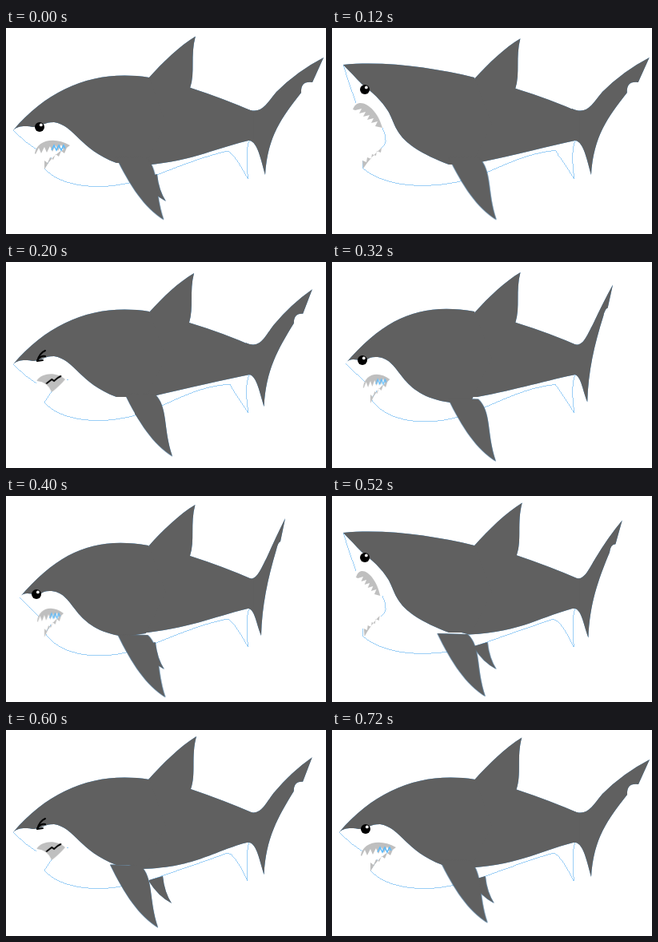
An HTML page without scripts that plays this animation: 400x258 px, repeating every 0.76 s.

```html
<!DOCTYPE html>
<html lang="en">
<head>
<meta charset="utf-8">
<title>Biting shark</title>
<style>
:root { --sine: cubic-bezier(.37, 0, .63, 1); }
html, body { margin: 0; width: 100%; height: 100%; overflow: hidden; background: #fff; }
svg { display: block; width: 100%; height: 100%; }

.skin { fill: #606060; filter: drop-shadow(0 0 .35px #42a5f5); }
.line { fill: none; stroke: #6fb9f3; stroke-width: .7; shape-rendering: crispEdges; }
.teeth { fill: #bfbfbf; }
.ink { fill: none; stroke: #000; stroke-width: 2; stroke-linecap: round; }

/* Two half-cycle swings a quarter turn apart carry the fins round an ellipse. */
.swing { animation: swing .38s -.165s var(--sine) infinite alternate; }
.back { animation-direction: alternate-reverse; }
.heave { animation: heave .38s -.7s var(--sine) infinite alternate; }
@keyframes swing { from { transform: translateX(-9px); } to { transform: translateX(9px); } }
@keyframes heave { from { transform: translateY(-6.5px); } to { transform: translateY(6.5px); } }

#body, #belly { animation: body .38s -.165s var(--sine) infinite alternate; }
#belly { animation-name: belly; }
@keyframes body {
  from { d: path("M178,62C196,42 217,21 238,8C231,33 238,55 231,74Q272,88 309,104V139C260,150 240,172 170,174L140,165Z"); }
  to { d: path("M179,63C196,44 216,25 235,14C229,37 235,57 229,76Q272,89 310,106V140C270,148 230,157 184,168L152,170Z"); }
}
@keyframes belly {
  from { d: path("M178,189C210,177 245,166 274,155Q284,150 302,189C302,170 300,150 304,141"); }
  to { d: path("M185,184C215,172 240,156 280,153Q283,160 303,189C300,170 299,150 305,140"); }
}

/* The tail turns away and the mouth narrows with it. */
#tail, #mouth { animation: tail .76s ease-in-out infinite; }
#mouth { animation-name: mouth; transform-origin: 48px 0; }
@keyframes tail {
  0%, 14%, 95%, 100% { d: path("M300,101C319,109 324,97 338,80Q364,54 397,37L383,68Q368,66 369,81C345,112 327,135 324,184C317,158 313,138 300,141Z"); }
  47%, 53% { d: path("M300,102C313,109 318,92 326,77Q338,50 349,28L343,57Q340,58 338,67C327,104 320,137 319,175C312,158 311,139 300,141Z"); }
}
@keyframes mouth {
  0%, 14%, 95%, 100% { transform: none; }
  47%, 53% { transform: scaleX(.75); }
}

/* Two bites per loop, with the head turned slightly away between them. */
#head, #jaw, #upper, #lower, #eye { animation: head .76s ease-in-out infinite; }
#jaw { animation-name: jaw; }
#upper { animation-name: upper; }
#lower { animation-name: lower; }
#eye { animation-name: eye; }
@keyframes head {
  0%, 26.3%, 78.9%, 100% { d: path("M179,62C114,52 56,73 9,128C16,121 28,123 34,124C46,123 47,118 60,118C86,122 92,152 138,169L175,169 200,120Z"); }
  15.8%, 68.4% { d: path("M178,62C128,50 68,41 14,46C22,54 30,63 37,70C50,80 62,91 70,104C82,124 76,144 146,171L175,171 200,120Z"); }
  42.1%, 52.6% { d: path("M178,62C112,51 68,68 17,127C22,120 30,122 36,124C46,124 44,118 57,119C88,122 81,167 148,176L175,172 200,120Z"); }
}
@keyframes jaw {
  0%, 26.3%, 78.9%, 100% { d: path("M9,128Q23,143 38,152M78,147Q77,148 76,148M57,162L48,176C68,199 119,205 165,191"); }
  15.8%, 68.4% { d: path("M14,46Q21,69 30,94M63,125Q72,143 61,151M38,166L39,176C65,198 115,203 165,191"); }
  42.1%, 52.6% { d: path("M17,127Q30,141 41,151M69,149Q68,149 67,149M56,161L49,172C68,201 119,207 165,192"); }
}
@keyframes upper {
  0%, 26.3%, 52.6%, 78.9%, 100% { d: path("M36,157C38,141 60,135 80,147l-8,6l-3,-7 -4,8l-3,-7 -4,8l-3,-7 -4,8l-3,-7 -4,8l-3,-7 -4,8z"); }
  15.8%, 68.4% { d: path("M26,102C32,84 56,98 63,125l-9,-2l3,-6 -8,2l3,-6 -8,2l3,-6 -8,2l3,-6 -8,2l3,-6 -8,2z"); }
}
@keyframes lower {
  0%, 26.3%, 52.6%, 78.9%, 100% { d: path("M48,177l0,-11l4,3 3,-7l4,3 3,-7l4,3 3,-7l4,3 3,-7Q58,158 48,177z"); }
  15.8%, 68.4% { d: path("M39,176l-1,-10l5,2 1,-6l5,2 1,-6l5,2 1,-6l5,2 1,-6Q48,162 39,176z"); }
}
@keyframes eye {
  0%, 26.3%, 78.9%, 100% { transform: translate(42px, 124px); }
  15.8%, 68.4% { transform: translate(41px, 77px); }
  42.1%, 52.6% { transform: translate(38px, 123px); }
}

.awake { animation: awake .76s step-end infinite; }
.chomp { animation: chomp .76s step-end infinite; }
.glint { animation: glint .76s step-end infinite; }
@keyframes awake { 0%, 36.7%, 89.3% { opacity: 1; } 26.2%, 78.8% { opacity: 0; } }
@keyframes chomp { 0%, 36.7%, 89.3% { opacity: 0; } 26.2%, 78.8% { opacity: 1; } }
@keyframes glint { 0%, 36.7%, 89.3% { opacity: 1; } 5%, 57.8% { opacity: 0; } }
</style>
</head>
<body>
<svg viewBox="0 0 400 258">
  <g class="line">
    <path id="jaw"/>
    <path id="belly"/>
  </g>
  <g class="skin">
    <path class="swing back" d="M170,188L187,183Q189,203 198,217Q181,208 170,190Z"/>
    <path id="tail"/>
    <path id="body"/>
    <path id="head"/>
    <g class="heave">
      <path class="swing" d="M139,167C157,204 175,231 199,246C187,210 194,184 177,168Z"/>
    </g>
  </g>
  <g id="mouth">
    <g class="awake teeth">
      <path id="upper"/>
      <path id="lower"/>
    </g>
    <path class="glint" fill="none" stroke="#5bbcff" stroke-width="1.5" d="M57,153l3,-6 3,6 3,-6 3,6 3,-6 2,4"/>
    <g class="chomp">
      <path class="teeth" d="M38,148C45,139 64,137 76,147Q70,154 58,163Q52,150 38,149Z"/>
      <path class="ink" d="M51,152L58,147 61,149 66,145 70,143"/>
    </g>
  </g>
  <g class="awake">
    <g id="eye">
      <circle r="6"/>
      <circle cx="1.8" cy="-2.6" r="1.9" fill="#fff"/>
    </g>
  </g>
  <path class="chomp ink" d="M39,124Q42,114 49,111M39,123Q43,117 49,118M39,124L46,123"/>
</svg>
</body>
</html>
```
